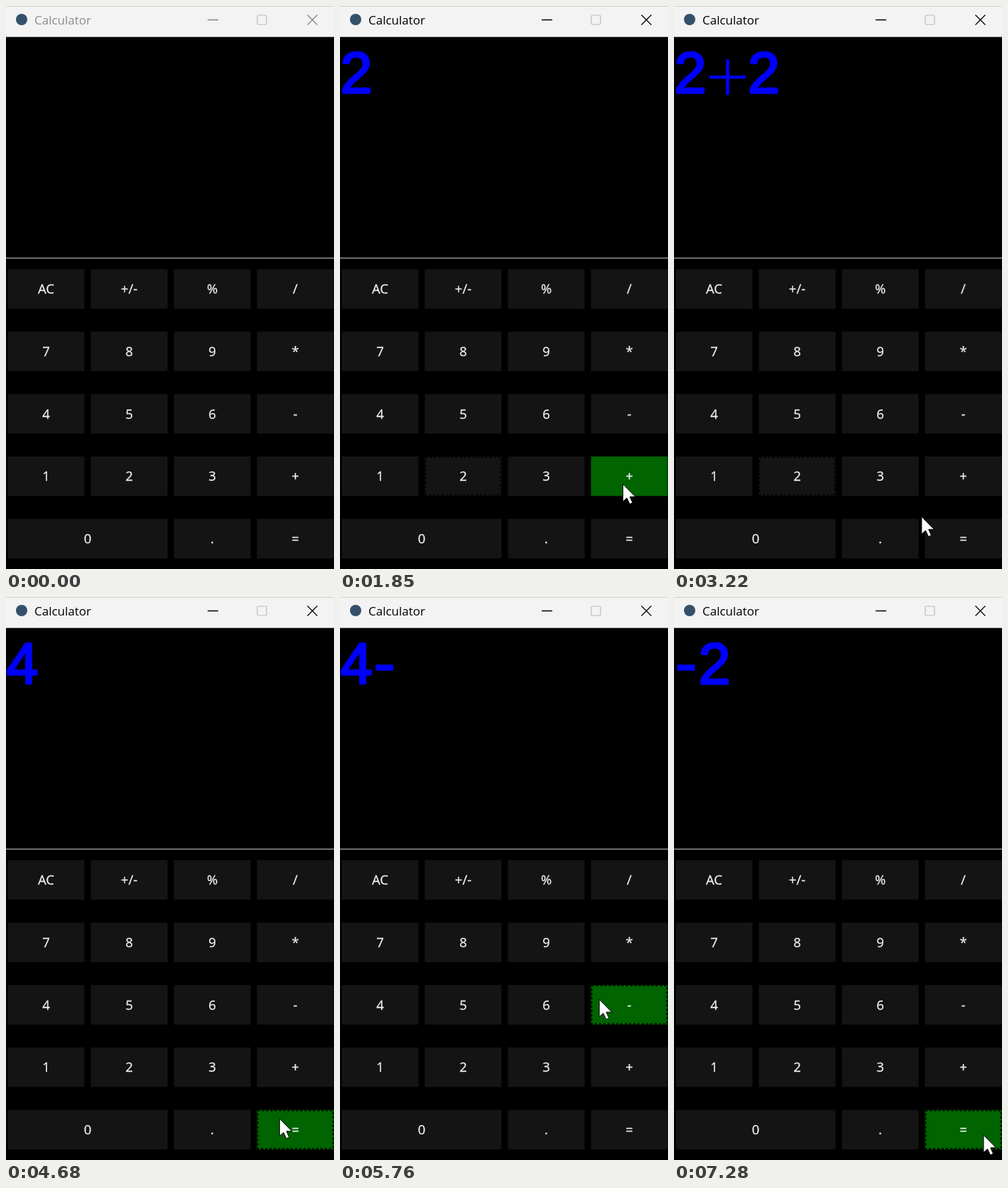
Recreate the animation shown at these times as an HTML page. Size 462 by 791 pixels, loop 8 s.

```html
<!DOCTYPE html>
<html lang="en">
<head>
<meta charset="utf-8">
<title>Calculator</title>
<style>
  html, body { margin: 0; width: 100%; height: 100%; overflow: hidden; background: #000; }
  svg { display: block; }
  .label { font: 18.5px "Open Sans", "Noto Sans", sans-serif; fill: #f0f0f0; stroke: #f0f0f0; stroke-width: .3; text-anchor: middle; }
  .title { font: 17px "Open Sans", "Noto Sans", sans-serif; }
  .digit { font: 81px "Liberation Sans", Arial, sans-serif; fill: #00f; stroke: #00f; stroke-width: 3; stroke-linejoin: round; }
  .sign { fill: none; stroke: #00f; }
  .key { fill: #141414; }
  .key.hover { fill: #006400; }
  .ring { fill: none; stroke: #000; stroke-width: 1.8; stroke-dasharray: 3 3; }
</style>
</head>
<body>
<svg width="462" height="791" viewBox="0 0 462 791">
  <rect width="462" height="791"/>
  <rect width="462" height="43.5" fill="#f3f3f3"/>
  <rect width="462" height="1" fill="#d0d0d0"/>
  <circle cx="22" cy="19" r="8" fill="#34506b"/>
  <text id="title" class="title" x="40" y="26">Calculator</text>
  <path id="controls" d="M284 19.5H299M424.5 12.5L438.5 26.5M438.5 12.5L424.5 26.5" fill="none" stroke-width="1.3"/>
  <rect x="354" y="13" width="13" height="13" rx="1.5" fill="none" stroke="#bcbcbc" stroke-width="1.2"/>
  <rect y="353.4" width="462" height="1.7" fill="#808080"/>
  <g id="display"></g>
  <g id="keys"></g>
  <rect id="ring" class="ring"/>
  <path id="cursor" d="M0 0V24.5L5.6 19.4L9.6 28L13.6 26.2L9.8 17.8H17.6Z"
        fill="#fff" stroke="#000" stroke-linejoin="round"/>
</svg>
<script>
const LOOP = 8000;
const STEP = 67;   // time between two pointer positions
const SVG_NS = "http://www.w3.org/2000/svg";
const $ = id => document.getElementById(id);

function set(el, attrs) {
  for (const name in attrs) el.setAttribute(name, attrs[name]);
  return el;
}

function add(parent, tag, attrs, text = "") {
  const el = set(document.createElementNS(SVG_NS, tag), attrs);
  el.textContent = text;
  parent.append(el);
  return el;
}

// Keypad on an even grid; the 0 key spans two columns
const PITCH_X = 117, PITCH_Y = 87.7, KEY_W = 108, KEY_H = 55.5;
const keys = {};

["AC +/- % /", "7 8 9 *", "4 5 6 -", "1 2 3 +", "0  . ="].forEach((row, r) => {
  row.split(" ").forEach((name, c) => {
    if (!name) return;
    const x = 2.5 + c * PITCH_X, y = 369.8 + r * PITCH_Y;
    const width = KEY_W + (name === "0" ? PITCH_X : 0);
    const el = add($("keys"), "rect", { x, y, width, height: KEY_H, class: "key" });
    add($("keys"), "text", { x: x + width / 2, y: y + KEY_H / 2 + 6.8, class: "label" }, name);
    keys[name] = { x, y, width, el };
  });
});

// Each click: the pointer leaves, arrives at (x, y), then the key is released
const start = { x: 337, y: 754 };
const clicks = [
  { key: "2", leave: 333,  arrive: 720,  release: 920,  x: 186, y: 666 },
  { key: "+", leave: 1253, arrive: 1856, release: 1990, x: 406, y: 672 },
  { key: "2", leave: 2120, arrive: 2580, release: 2830, x: 214, y: 645 },
  { key: "=", leave: 2950, arrive: 3331, release: 3610, x: 385, y: 737 },
  { key: "-", leave: 4612, arrive: 5353, release: 5490, x: 400, y: 561 },
  { key: "6", leave: 5620, arrive: 5945, release: 6310, x: 306, y: 573 },
  { key: "=", leave: 6510, arrive: 7140, release: 7280, x: 436, y: 756 }
];
const appear = clicks[0].leave + STEP;
const pressTime = click => click.release - STEP;

const ease = k => k * k * (3 - 2 * k);

function pointerAt(t) {
  if (t < appear) return null;
  const i = clicks.findLastIndex(click => click.leave <= t);
  const from = clicks[i - 1] || start, to = clicks[i];
  const moved = Math.floor((t - to.leave) / STEP) * STEP;
  const k = ease(Math.min(1, moved / (to.arrive - to.leave)));
  return { x: from.x + (to.x - from.x) * k, y: from.y + (to.y - from.y) * k };
}

function evaluate(text) {
  const [, a, sign, b] = text.match(/(\d+)([+-])(\d+)/);
  return String(sign === "+" ? +a + +b : a - b);
}

const readoutAt = t => clicks
  .filter(click => click.release <= t)
  .reduce((text, { key }) => key === "=" ? evaluate(text) : text + key, "");

function drawReadout(text) {
  const box = $("display");
  if (box.dataset.text === text) return;
  box.dataset.text = text;
  box.replaceChildren();
  let x = 0.5;
  for (const ch of text) {
    if (ch === "+") {
      add(box, "path", { d: `M${x + 4} 100h51m-25.5 -25v50`, class: "sign", "stroke-width": 4.6 });
      x += 58;
    } else if (ch === "-") {
      add(box, "path", { d: `M${x + 4} 99.2h25`, class: "sign", "stroke-width": 8.5 });
      x += 34;
    } else {
      add(box, "text", { x, y: 121.5, class: "digit" }, ch);
      x += 45.5;
    }
  }
}

function drawRing(click) {
  $("ring").style.display = click ? "" : "none";
  if (!click) return;
  const { x, y, width } = keys[click.key];
  set($("ring"), { x: x + 1, y: y + 1, width: width - 2, height: KEY_H - 2 });
}

function drawPointer(p) {
  $("cursor").style.display = p ? "" : "none";
  if (p) set($("cursor"), { transform: `translate(${p.x.toFixed(1)} ${p.y.toFixed(1)})` });
  for (const { x, y, width, el } of Object.values(keys)) {
    const over = p && p.x >= x && p.x < x + width && p.y >= y && p.y < y + KEY_H;
    el.classList.toggle("hover", Boolean(over));
  }
}

function render(t) {
  const pressed = clicks.findLast(click => pressTime(click) <= t);
  set($("title"), { fill: pressed ? "#000" : "#8c8c8c" });
  set($("controls"), { stroke: pressed ? "#000" : "#858585" });
  drawReadout(readoutAt(t));
  drawRing(pressed);
  drawPointer(pointerAt(t));
}

const begin = performance.now();
function tick() {
  render((performance.now() - begin) % LOOP);
  requestAnimationFrame(tick);
}
tick();
</script>
</body>
</html>
```
